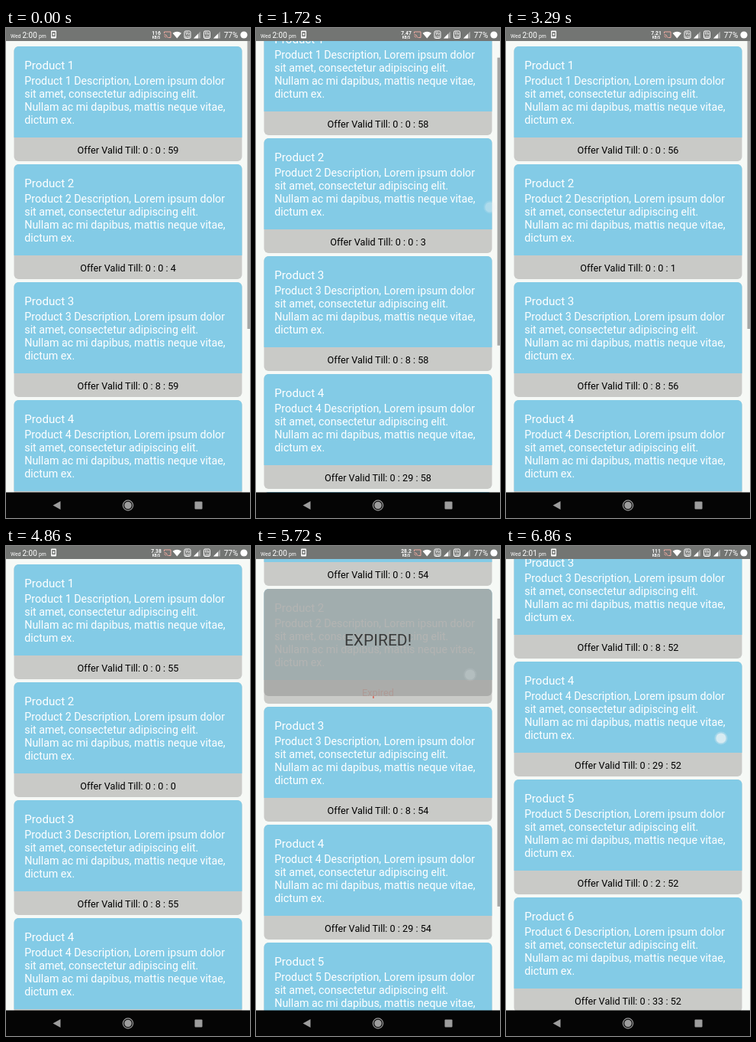
Write an HTML page that moves like this. It is 320 px wide and 640 px high and loops after 7 s.

```html
<!DOCTYPE html>
<html lang="en">
<head>
<meta charset="utf-8">
<title>Product offers</title>
<style>
html, body { margin: 0; width: 100%; height: 100%; overflow: hidden; background: #f6f9f6; }
svg { display: block; width: 100vw; height: 100vh; font-family: Roboto, sans-serif; }
.title { font-size: 15.1px; }
.desc { font-size: 14.25px; }
.title, .desc { fill: #fff; }
.offer { font-size: 12.7px; text-anchor: middle; }
.big { font-size: 21px; text-anchor: middle; fill: #393b3b; }
#status { fill: #fff; font-size: 10px; }
#status .small { font-size: 6.8px; }
#status .rate { font-weight: 700; text-anchor: middle; }
#nav { fill: #9d9d9d; }
</style>
</head>
<body>
<svg viewBox="0 0 320 640">
  <defs>
    <clipPath id="view"><rect y="17" width="320" height="590"/></clipPath>
    <g id="volte">
      <rect x=".5" y=".5" width="8" height="9.5" rx="1.5" fill="none" stroke="#fff"/>
      <text x="4.5" y="5" font-size="4.5" text-anchor="middle" font-weight="700">Vo</text>
      <text x="4.5" y="9" font-size="3.8" text-anchor="middle" font-weight="700">LTE</text>
    </g>
    <g id="signal">
      <path d="M0 9L9 0V9Z" opacity=".35"/>
      <path d="M0 9L6 3V9Z"/>
    </g>
  </defs>
  <rect width="320" height="640" fill="#f6f9f6"/>
  <g clip-path="url(#view)">
    <g id="list"></g>
    <rect id="bar" x="316.5" width="3.5" height="376" fill="#a5a7a6"/>
    <g id="touch" fill="#ebf3f5">
      <circle r="8.5" opacity=".3"/>
      <circle r="6.6" opacity=".72"/>
    </g>
  </g>
  <g id="status">
    <rect width="320" height="17" fill="#737573"/>
    <text class="small" x="6" y="12.5">Wed</text>
    <text id="clock" x="21.5" y="12.5"></text>
    <text class="small" x="43" y="12.5">pm</text>
    <rect x="59" y="3.5" width="7" height="10" rx="1"/>
    <rect x="60.2" y="5.2" width="4.6" height="6" fill="#737573"/>
    <rect x="61.5" y="7" width="2" height="2.5"/>
    <text id="speed" class="rate" x="197" y="9.2" font-size="6.8"></text>
    <text class="rate" x="197" y="13.6" font-size="4.6">KB/S</text>
    <path d="M207.5 7V5H216V12.5H212.5M207.5 8.5A4 4 0 0 1 211.5 12.5M207.5 10.7A2 2 0 0 1 209.4 12.5" fill="none" stroke="#eda99f"/>
    <path d="M218.6 6.8Q224.3 2.6 230 6.8L224.3 13.4Z"/>
    <use href="#volte" x="233.5" y="3.5"/>
    <use href="#signal" x="246" y="4.5"/>
    <use href="#volte" x="259" y="3.5"/>
    <use href="#signal" x="272" y="4.5"/>
    <text x="285.7" y="12.5">77%</text>
    <circle cx="312" cy="9" r="4.6"/>
  </g>
  <g id="nav">
    <rect y="606.5" width="320" height="34" fill="#050505"/>
    <path d="M61.5 623.5L71.5 618V629Z"/>
    <circle cx="160" cy="623.5" r="6.6" fill="none" stroke="#9d9d9d" stroke-width="1.2"/>
    <circle cx="160" cy="623.5" r="4.8"/>
    <rect x="247.5" y="618.5" width="10" height="10" rx="1"/>
  </g>
</svg>
<script>
const LOOP = 7000, STEP = 1000 / 7;
const LEAD = 120;              // finger rests before it moves
const HOLD = 430, FADE = 285;  // scrollbar after a swipe
const $ = id => document.getElementById(id);
const clamp = v => Math.max(0, Math.min(1, v));
const smooth = p => p * p * (3 - 2 * p);

const offers = [59, 4, 539, 1799, 179, 2039]; // seconds left at the start
const speeds = ['116', '7.47', '7.47', '6.58', '7.21', '7.38', '28.2', '111'];

// Scroll goes from one offset to another; the finger starts at x, y and lifts before the end
const swipes = [
  { start: -500, time: 500, from: 0, to: 0, x: 0, y: 0, lift: -200 },
  { start: 1400, time: 597, from: 0, to: 63, x: 294, y: 285, lift: 1640 },
  { start: 2700, time: 450, from: 63, to: 0, x: 288, y: 195, lift: 3060 },
  { start: 5265, time: 1100, from: 0, to: 335, x: 272, y: 351, lift: 5610 },
  { start: 6970, time: 600, from: 335, to: 335, x: 282, y: 251, lift: 7300 }
];

function card(n) {
  const lines = [`Product ${n} Description, Lorem ipsum dolor`, 'sit amet, consectetur adipiscing elit.',
    'Nullam ac mi dapibus, mattis neque vitae,', 'dictum ex.'];
  return `<g transform="translate(0 ${24 + 154 * (n - 1)})">
    <rect x="10.5" width="299" height="150" rx="6" fill="#c9cac7"/>
    <path d="M10.5 119V6a6 6 0 0 1 6-6h287a6 6 0 0 1 6 6v113z" fill="#83cbe6"/>
    <text class="title" x="24.3" y="30">Product ${n}</text>
    ${lines.map((s, i) => `<text class="desc" x="24.3" y="${50 + 17 * i}">${s}</text>`).join('')}
    <text class="offer" x="160" y="140"></text>
    <g class="cover">
      <rect x="10.5" width="299" height="140" rx="6" fill="#a7a8a6" opacity=".86"/>
      <text class="big" x="160" y="74">EXPIRED!</text>
    </g></g>`;
}

$('list').innerHTML = offers.map((_, i) => card(i + 1)).join('');
const labels = document.querySelectorAll('.offer');
const covers = document.querySelectorAll('.cover');

function draw(t) {
  const passed = Math.floor((t + 103) / 993);
  offers.forEach((start, i) => {
    const left = start - passed, gone = left < 0;
    labels[i].textContent = gone ? 'Expired' : `Offer Valid Till: 0 : ${Math.floor(left / 60)} : ${left % 60}`;
    labels[i].setAttribute('fill', gone ? '#e0402c' : '#000');
    covers[i].setAttribute('visibility', gone ? 'visible' : 'hidden');
  });

  const s = swipes.filter(s => t >= s.start - LEAD).pop();
  const p = smooth(clamp((t - s.start) / s.time));
  const moved = (s.to - s.from) * p, scroll = s.from + moved;
  $('list').setAttribute('transform', `translate(0 ${-scroll})`);

  const fadeEnd = s.start + s.time + HOLD + FADE;
  $('bar').setAttribute('y', 17 + scroll * .638);
  $('bar').setAttribute('opacity', t < s.start ? 0 : clamp((fadeEnd - t) / FADE));

  $('touch').setAttribute('transform', `translate(${s.x + 24 * p} ${s.y - 1.5 * moved})`);
  $('touch').setAttribute('opacity', clamp(1 - (t - s.lift) / 150));

  $('speed').textContent = speeds[Math.floor((t + 870) / 1000)];
  $('clock').textContent = t < 6400 ? '2:00' : '2:01';
}

// The screen refreshes seven times a second
const begin = performance.now();
function frame() {
  const t = (performance.now() - begin) % LOOP;
  draw(Math.floor((t + 4) / STEP) % 49 * STEP);
  requestAnimationFrame(frame);
}
frame();
</script>
</body>
</html>
```
